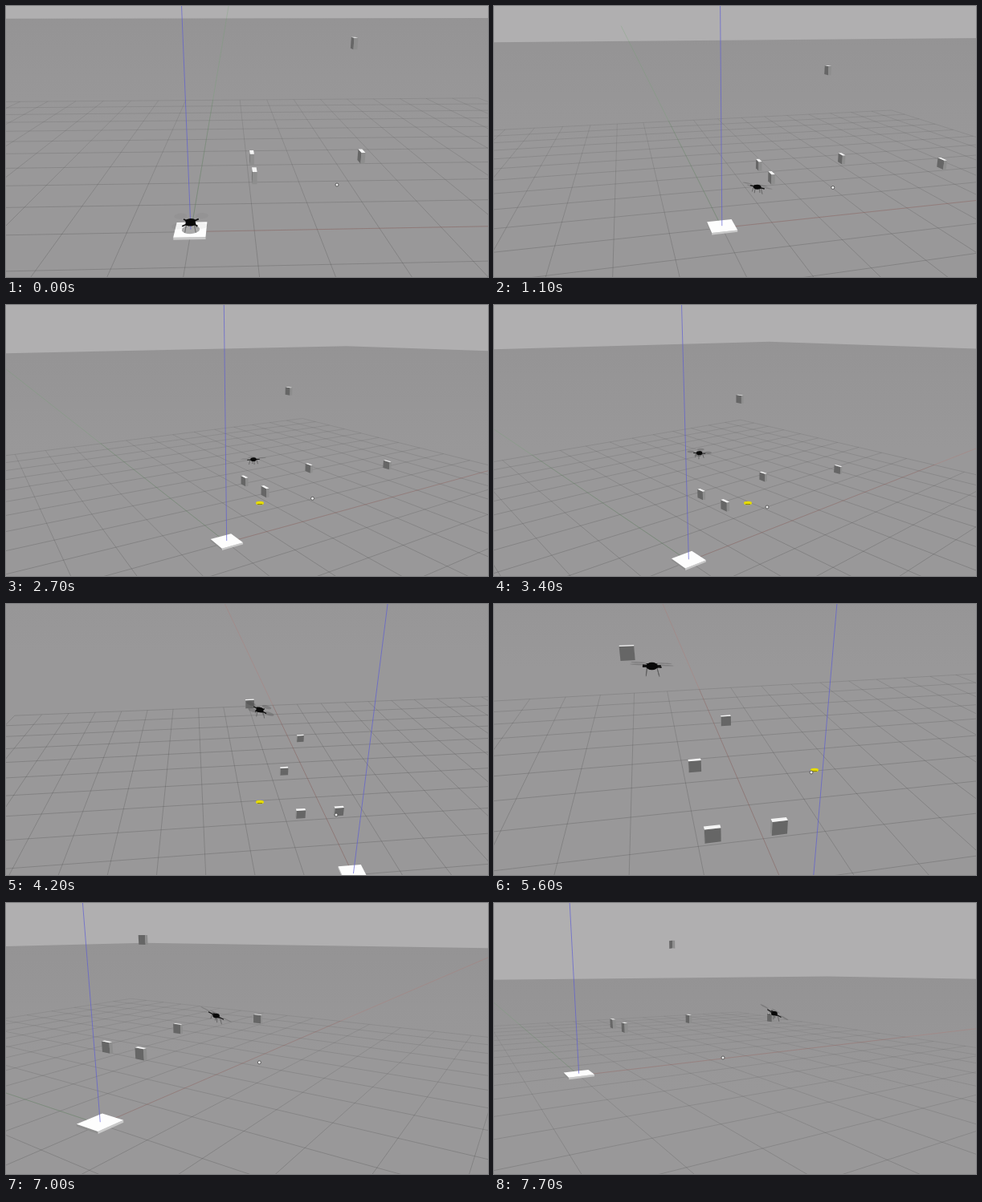
Animation of 600 by 338 pixels, one loop 8400 ms. Source, as an HTML page with a canvas:

```html
<!DOCTYPE html>
<html lang="en">
<head>
<meta charset="utf-8">
<title>Drone simulation</title>
<style>
html, body { margin: 0; width: 100%; height: 100%; overflow: hidden; background: #989798; }
canvas { display: block; width: 600px; height: 338px; }
</style>
</head>
<body>
<canvas id="stage" width="600" height="338"></canvas>
<script>
const ctx = document.getElementById('stage').getContext('2d');
const W = 600, H = 338, FOCAL = 560, LOOP = 8400, STEP = 100, LAST = 7700, NEAR = 0.1;
const ANCHOR = [2.93, 1.52, 0];

// cam: yaw, pitch, then depth and screen place of the anchor; drone: world place
const KEYS = [
  { t: 0, cam: [1.533, 0.3, 8.63, 429, 230], drone: [0, 0, 0.16], mouse: [412, 223] },
  { t: 1900, cam: [1.18, 0.224, 12.2, 408, 224], drone: [1.56, 1.2, 0.74], mouse: [429, 229] },
  { t: 3400, cam: [0.87, 0.247, 11.9, 316, 247], drone: [2.47, 3.03, 1.13], mouse: [340, 252] },
  { t: 4200, cam: [-0.113, 0.433, 11.7, 316, 247], drone: [1.89, 1.7, 2.97], mouse: [411, 263] },
  { t: 5600, cam: [-0.195, 0.405, 7.45, 207, 265], drone: [2.33, 1.48, 2.68], mouse: [395, 210] },
  { t: 6500, cam: [0.25, 0.285, 8.95, 163, 213.5], drone: [3, 1.1, 1.15], mouse: [337, 203] },
  { t: LAST, cam: [1.02, 0.152, 11.85, 232, 184], drone: [4.49, -0.49, 1.07], mouse: [285, 193] }
];
const PIVOTS = [
  { from: 2300, to: 4600, at: [316, 247] },
  { from: 5000, to: 6000, at: [399, 207] },
  { from: 6000, to: 7000, at: [373, 210] }
];

// a zigzag row of boxes, and one floating above
const BOXES = Array.from({ length: 4 }, (_, i) => [1 + 1.9 * Math.max(0, i - 1), i % 2 ? 0.08 : 0.92, 0.9]);
BOXES.push([2.88, 1.8, 2.75]);

const dot = (a, b) => a[0] * b[0] + a[1] * b[1] + a[2] * b[2];
const sub = (a, b) => a.map((v, i) => v - b[i]);
const mix = (a, b, k) => a.map((v, i) => v + (b[i] - v) * k);

function sample(name, t) {
  let i = 0;
  while (i < KEYS.length - 2 && t >= KEYS[i + 1].t) i++;
  const a = KEYS[i], b = KEYS[i + 1];
  return mix(a[name], b[name], (t - a.t) / (b.t - a.t));
}

let axes, eye;

function aim([yaw, pitch, depth, u, v]) {
  const c = Math.cos(yaw), s = Math.sin(yaw), cp = Math.cos(pitch), sp = Math.sin(pitch);
  axes = [[s, -c, 0], [-c * sp, -s * sp, -cp], [c * cp, s * cp, -sp]];
  const place = [(u - W / 2) * depth / FOCAL, (v - H / 2) * depth / FOCAL, depth];
  eye = ANCHOR.map((a, i) => a - axes.reduce((sum, ax, j) => sum + ax[i] * place[j], 0));
}

const view = p => { const d = sub(p, eye); return axes.map(a => dot(a, d)); };
const flat = p => [W / 2 + FOCAL * p[0] / p[2], H / 2 + FOCAL * p[1] / p[2]];

function trace(points) {
  ctx.beginPath();
  points.forEach(p => ctx.lineTo(...flat(p)));
}

function fill(points, color) {
  const cam = points.map(view), kept = [];
  cam.forEach((a, i) => {
    const b = cam[(i + 1) % cam.length];
    if (a[2] >= NEAR) kept.push(a);
    if ((a[2] < NEAR) !== (b[2] < NEAR)) kept.push(mix(a, b, (NEAR - a[2]) / (b[2] - a[2])));
  });
  trace(kept);
  ctx.fillStyle = color;
  ctx.fill();
}

function line(p, q, color, width = 1) {
  let a = view(p), b = view(q);
  if (a[2] < b[2]) [a, b] = [b, a];
  if (a[2] < NEAR) return;
  if (b[2] < NEAR) b = mix(a, b, (a[2] - NEAR) / (a[2] - b[2]));
  trace([a, b]);
  ctx.strokeStyle = color;
  ctx.lineWidth = width;
  ctx.stroke();
}

// colors: faces across x, y and z
function block(center, size, colors) {
  for (let axis = 0; axis < 3; axis++) {
    const gap = eye[axis] - center[axis];
    if (Math.abs(gap) < size[axis] / 2) continue;
    const corners = [[-1, -1], [1, -1], [1, 1], [-1, 1]].map(([m, n]) => {
      const dir = [];
      dir[axis] = Math.sign(gap);
      dir[(axis + 1) % 3] = m;
      dir[(axis + 2) % 3] = n;
      return center.map((c, i) => c + dir[i] * size[i] / 2);
    });
    fill(corners, colors[axis]);
  }
}

const ring = (at, radius) => Array.from({ length: 20 }, (_, i) => {
  const a = i * Math.PI / 10;
  return at(radius * Math.cos(a), radius * Math.sin(a));
});

// leans into its direction of flight
function drone(t) {
  const [x, y, z] = sample('drone', t);
  const resting = z < 0.3;
  const [sx, sy] = sub(sample('drone', t - 300), sample('drone', t + 300)).map(d => resting ? 0 : d / 2);
  const at = (dx, dy, dz = 0) => [x + dx, y + dy, z + dx * sx + dy * sy + dz];
  const px = FOCAL / view([x, y, z])[2];
  for (const m of [0.17, -0.17]) for (const n of [0.17, -0.17]) {
    line(at(m * 0.35, n * 0.35), at(m * 0.5, n * 0.5, -0.13), '#5a5a5a', 0.8);
    fill(ring((a, b) => at(m + a, n + b, 0.03), 0.1), `rgba(60,60,60,${resting ? 0.06 : 0.28})`);
    line(at(0, 0), at(m * 0.7, n * 0.7), '#111', px * 0.022);
  }
  for (const dz of [-0.02, 0.03]) fill(ring((a, b) => at(a, b, dz), 0.08), '#080808');
  const [cx, cy] = flat(view([x, y, z]));
  ctx.beginPath();
  ctx.ellipse(cx, cy, px * 0.075, px * 0.05, 0, 0, 7);
  ctx.fill();
}

function fade(horizon, from, to, far, near) {
  const g = ctx.createLinearGradient(0, horizon + from, 0, horizon + to);
  g.addColorStop(0, far);
  g.addColorStop(1, near);
  return g;
}

function scenery(resting) {
  ctx.fillStyle = '#b0afb0';
  ctx.fillRect(0, 0, W, H);
  const horizon = H / 2 + FOCAL * axes[2][2] / Math.hypot(axes[2][0], axes[2][1]);
  const ground = fade(horizon, 0, 150, '#949394', '#999899');
  fill([[-100, -100, 0], [100, -100, 0], [100, 100, 0], [-100, 100, 0]], ground);

  const grid = fade(horizon, 40, 280, 'rgba(70,70,70,.1)', 'rgba(70,70,70,.34)');
  for (let i = -10; i <= 10; i++) {
    line([i, -10, 0], [i, 10, 0], grid, 0.8);
    line([-10, i, 0], [10, i, 0], grid, 0.8);
  }
  line([0, 0, 0], [1000, 0, 0], 'rgba(200,90,80,.18)');
  line([0, 0, 0], [0, 1000, 0], 'rgba(95,165,95,.22)');

  block([0, 0, 0.02], [0.49, 0.49, 0.04], ['#8e8e8e', '#c8c8c8', '#fdfdfd']);
  if (resting) fill(ring((a, b) => [a, b, 0.04], 0.14), '#aaa');
  line([0, 0, 0.04], [0, 0, 100], 'rgba(92,92,212,.75)', 0.9);
}

function pointer(x, y) {
  ctx.beginPath();
  ctx.arc(x, y, 2, 0, 7);
  ctx.fillStyle = '#eee';
  ctx.fill();
  ctx.strokeStyle = '#444';
  ctx.lineWidth = 0.8;
  ctx.stroke();
}

function pivot(x, y) {
  ctx.beginPath();
  ctx.ellipse(x, y, 5, 2.3, 0, 0, 7);
  ctx.fillStyle = '#e6dc00';
  ctx.fill();
  ctx.fillStyle = '#8f8800';
  ctx.fillRect(x - 3, y + 1, 6, 1);
}

function draw(t) {
  const craft = sample('drone', t);
  aim(sample('cam', t));
  scenery(craft[2] < 0.3);
  const parts = BOXES.map(b => ({
    depth: view(b)[2],
    paint: () => block(b, [0.07, 0.2, 0.2], ['#666', '#8e8e8e', '#f4f4f4'])
  }));
  parts.push({ depth: view(craft)[2], paint: () => drone(t) });
  parts.sort((a, b) => b.depth - a.depth).forEach(p => p.paint());
  PIVOTS.filter(p => t >= p.from && t < p.to).forEach(p => pivot(...p.at));
  pointer(...sample('mouse', t));
}

function tick(now) {
  const t = Math.floor(now % LOOP / STEP) * STEP;
  draw(Math.min(t, LAST));
  requestAnimationFrame(tick);
}
requestAnimationFrame(tick);
</script>
</body>
</html>
```
